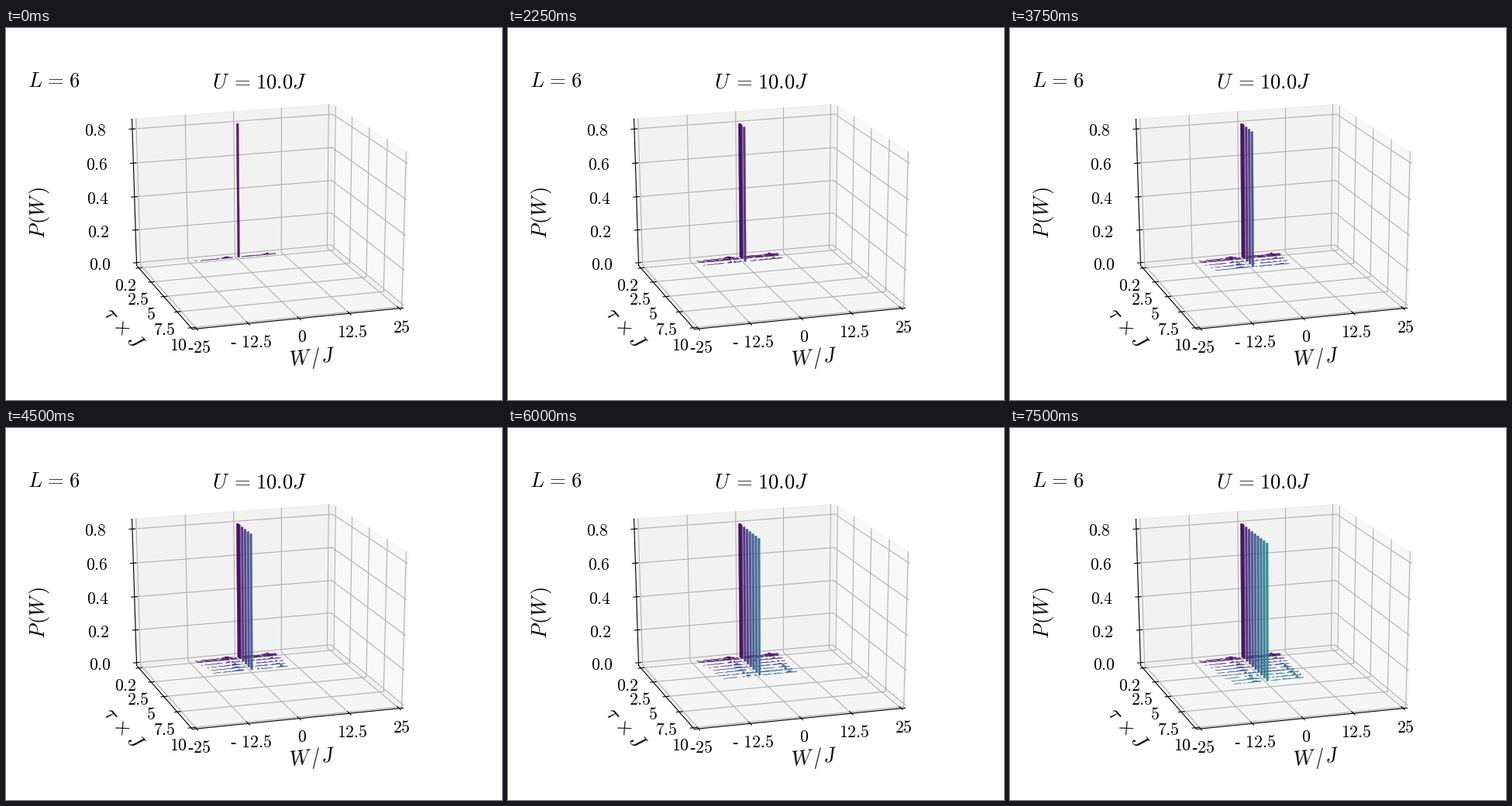
Animation of 640 by 480 pixels, one loop 8 s. Source, as a matplotlib script:

```python
from itertools import product

import numpy as np
import matplotlib.pyplot as plt
from matplotlib.animation import FuncAnimation
from matplotlib.collections import PolyCollection

plt.rcParams["mathtext.fontset"] = "cm"
plt.rcParams["font.family"] = "Liberation Serif"

TITLE, LABEL = 19.2, 15.7
INTERVAL, FRAMES, HOLD = 250, 32, 3
TAUS = [0.2, 0.35, *np.arange(0.5, 4.6, 0.5)]

fig = plt.figure(figsize=(6.4, 4.8), dpi=100, facecolor="white")
ax = fig.add_axes([0, 0, 1, 1])
ax.set_xlim(-0.5, 639.5)
ax.set_ylim(479.5, -0.5)
ax.axis("off")

# stage position of the visible box corners, ordered by (W, tau, P) = 0 or 1
CORNERS = [(168, 306), (162, 117), (240, 388), (418.8, 282.7),
           (421, 98.3), (512, 361), (518, 160.5)]


def solve_camera():
    """Perspective matrix that maps the unit box onto the stage."""
    visible = [c for c in product((0, 1), repeat=3) if c != (0, 1, 1)]
    rows, rhs = [], []
    for corner, (x, y) in zip(visible, CORNERS):
        x, y = (x - 320) / 100, (y - 240) / 100
        q = np.array([*corner, 1.0])
        rows.append(np.r_[q, np.zeros(4), -x * q[:3]])
        rows.append(np.r_[np.zeros(4), q, -y * q[:3]])
        rhs += [x, y]
    sol = np.linalg.lstsq(np.array(rows), np.array(rhs), rcond=None)[0]
    return np.r_[sol, 1.0].reshape(3, 4)


CAMERA = solve_camera()


def project(points):
    pts = np.asarray(points, float)
    h = np.c_[pts, np.ones(len(pts))] @ CAMERA.T
    return h[:, :2] / h[:, 2:] * 100 + [320, 240]


def unit_w(w):
    return (w + 26.04) / 52.08


def unit_tau(t):
    return (t + 0.4635) / 10.677


def unit_p(p):
    return (p + 0.0175) / 0.875


def line(points, color="black", z=4):
    x, y = project(points).T
    ax.plot(x, y, color=color, lw=0.8, zorder=z, solid_joinstyle="round")


def grid(*points):
    line(points, "#b0b0b0", 2)


def pane(points, gray):
    color = (gray, gray, gray, 0.5)
    ax.fill(*project(points).T, facecolor=color, edgecolor=color, lw=1, zorder=1)


def text(x, y, s, size=LABEL, ha="center", va="center_baseline", **kw):
    ax.text(x, y, s, fontsize=size, ha=ha, va=va, zorder=9, **kw)


def tick(start, end, label, dx, dy):
    """Short axis mark with its label at a fixed offset from the middle."""
    line([start, end])
    x, y = project([start, end]).mean(axis=0)
    sign = "-" if label < 0 else ""
    gap = r"\hspace{0.09}" if label == -12.5 else ""
    space = " " if gap else ""
    digits = "%.1f" % label if dx < -40 else "%g" % abs(label)
    text(x + dx, y + dy, r"%s%s$%s\mathrm{%s}$" % (sign, space, gap, digits))


# walls and floor
pane([(0, 0, 0), (0, 0, 1), (1, 0, 1), (1, 0, 0)], 0.9)
pane([(1, 0, 0), (1, 0, 1), (1, 1, 1), (1, 1, 0)], 0.95)
pane([(0, 0, 0), (1, 0, 0), (1, 1, 0), (0, 1, 0)], 0.925)

# grid, ticks and tick labels
for w in np.linspace(-25, 25, 5):
    u = unit_w(w)
    grid((u, 0, 1), (u, 0, 0), (u, 1, 0))
    tick((u, 0.975, 0), (u, 1.02, 0), w, 3.5, 23.5)
for t in np.linspace(0, 10, 5):
    v = unit_tau(t)
    grid((1, v, 1), (1, v, 0), (0, v, 0))
    tick((-0.013, v, 0), (0.015, v, 0), t or TAUS[0], -17, 22)
for p in np.linspace(0, 0.8, 5):
    h = unit_p(p)
    grid((0, 0, h), (1, 0, h), (1, 1, h))
    tick((-0.015, 0, h), (0.013, 0, h), p, -47, 2)
line([(0, 0, 1), (0, 0, 0), (0, 1, 0), (1, 1, 0)])

# headings and axis names
text(27, 75.5, r"$L\hspace{0.11}=\hspace{0.11}\mathrm{6}$", TITLE,
     ha="left", va="baseline")
text(265.8, 77.5, r"$U\hspace{0.23}=\hspace{0.11}\mathrm{10.0}J$", TITLE,
     ha="left", va="baseline")
text(43, 238, r"$P\hspace{0.1}(W\hspace{0.13})$", TITLE, va="center", rotation=90)
text(151, 388, r"$\tau\hspace{0.12}\times\hspace{0.05}J$", TITLE,
     va="center", rotation=-48.7)
text(395, 426.5, r"$W\hspace{0.12}/J$", TITLE, va="center", rotation=5.7)


def bump(w, center, width):
    return np.exp(-((w - center) / width) ** 2)


def spectrum(k, tau):
    """Work values and probabilities for one duration."""
    rng = np.random.RandomState(20 + k)
    w = np.arange(-11.5 + 0.7 * tau, 9.9 - 0.1 * tau, 0.5)
    w = w[(np.abs(w) > 0.9) & (rng.rand(len(w)) < 0.85)]
    p = rng.uniform(0, 0.005, len(w)) * np.clip((w + 11) / 9, 0.1, 1)
    p += 0.008 * bump(w, -3.3, 0.8) + (0.007 + 0.0015 * tau) * bump(w, 7.7, 0.35)
    return np.r_[w, 0], np.r_[p, 0.805]


def bar(w, p, tau, half=0.28):
    a, b, v = unit_w(w - half), unit_w(w + half), unit_tau(tau)
    lo, hi = unit_p(0), unit_p(p)
    return project([(a, v, lo), (a, v, hi), (b, v, hi), (b, v, lo)])


rows = []
for k, tau in enumerate(TAUS):
    quads = [bar(w, p, tau) for w, p in zip(*spectrum(k, tau))]
    color = plt.cm.viridis(tau / 10)
    row = PolyCollection(quads, facecolors=[color], edgecolors=[color],
                         linewidths=0.25, alpha=0.9, zorder=5 + 0.1 * k)
    rows.append(ax.add_collection(row, autolim=False))


def update(i):
    for k, row in enumerate(rows):
        row.set_visible(k <= i // HOLD)
    return rows


anim = FuncAnimation(fig, update, frames=FRAMES, interval=INTERVAL,
                     repeat=True, repeat_delay=0, blit=False)
plt.show()
```
